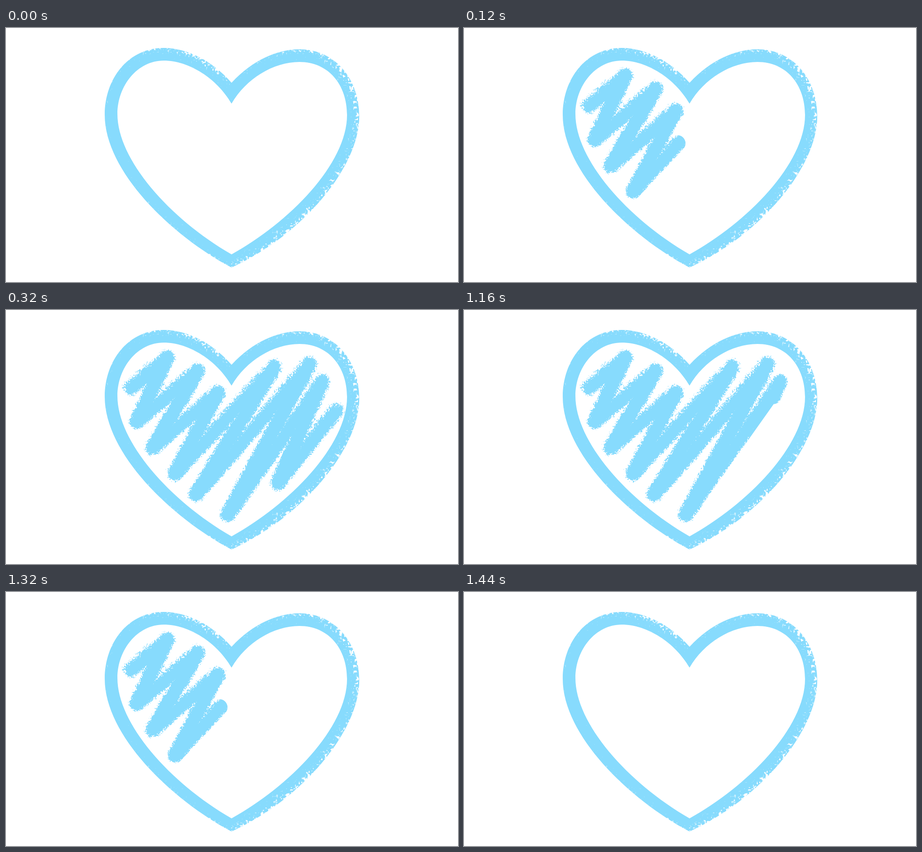
These frames come from a looping animation (998 by 561 pixels, 1960 ms). An HTML page with a canvas:

```html
<!DOCTYPE html>
<html lang="en">
<head>
<meta charset="utf-8">
<title>Scribbled heart</title>
<style>
  html, body { margin: 0; width: 100%; height: 100%; overflow: hidden; background: #fff; }
  canvas { display: block; width: 100%; height: 100%; }
</style>
</head>
<body>
<canvas id="stage" width="998" height="561"></canvas>
<script>
const start = performance.now();
const W = 998, H = 561, BLUE = '#87dbfd';
const LOOP = 1960, STEP = 40, STEPS = 8, ERASE_AT = 1160, LEAD_IN = 80;

const OUTER = 'M498 121C455 72 400 44 348 44C270 44 218 112 218 192C218 316 364 458 498 529' +
  'C650 460 780 310 780 195C780 112 726 47 648 47C600 47 545 70 498 121Z';
const INNER = 'M498 167C466 112 405 72 348 72C290 72 246 128 246 190C246 290 360 420 498 500' +
  'C625 430 753 300 753 192C753 125 712 75 648 75C590 75 530 112 498 167Z';

// Turning points of the crayon scribble
const TURNS = [
  [276, 170], [355, 105], [289, 245], [422, 134], [324, 303], [467, 182], [373, 360],
  [591, 126], [420, 406], [669, 120], [490, 450], [697, 158], [600, 381], [728, 222]
];

const clamp = v => Math.max(0, Math.min(1, v));
const mix = (a, b, t) => a + (b - a) * t;

function makeLayer() {
  const layer = document.createElement('canvas');
  layer.width = W;
  layer.height = H;
  layer.fillStyle = BLUE;
  return layer.getContext('2d', { willReadFrequently: true });
}

function hash(x, y) {
  let h = Math.imul(x, 374761393) + Math.imul(y, 668265263) | 0;
  h = Math.imul(h ^ h >>> 13, 1274126177);
  return ((h ^ h >>> 16) >>> 0) / 4294967296;
}

function grain(x, y, size) {
  x /= size;
  y /= size;
  const i = Math.floor(x), j = Math.floor(y), u = x - i, v = y - j;
  return mix(mix(hash(i, j), hash(i + 1, j), u), mix(hash(i, j + 1), hash(i + 1, j + 1), u), v);
}

// Fills the layer in blue, then scales each pixel's alpha by keep(x, y, index)
function texture(path, keep) {
  const layer = makeLayer();
  layer.fillStyle = BLUE;
  layer.fill(path, 'evenodd');
  const image = layer.getImageData(0, 0, W, H);
  for (let y = 0, k = 3; y < H; y++) {
    for (let x = 0; x < W; x++, k += 4) {
      if (image.data[k]) image.data[k] *= keep(x, y, k);
    }
  }
  layer.putImageData(image, 0, 0);
  return layer.canvas;
}

// A blurred, shifted heart tells how near a pixel is to an edge that faces right
function makeHeart() {
  const soft = makeLayer();
  soft.filter = 'blur(12px)';
  soft.translate(-10, 0);
  soft.fill(new Path2D(OUTER));
  const inside = soft.getImageData(0, 0, W, H).data;
  return texture(new Path2D(OUTER + INNER), (x, y, k) => {
    const slope = mix(.5, 1, clamp(Math.abs(y - 265) / 130));
    const wear = .75 * slope * (1 - inside[k] / 255) - .05;
    const n = grain(x, y, 2.8);
    const bare = clamp((wear - n) * 9);
    const pale = .3 * clamp((wear + .12 - n) * 9);
    return 1 - Math.max(bare, pale);
  });
}

const segments = TURNS.slice(1).map(([bx, by], i) => {
  const [ax, ay] = TURNS[i], dx = bx - ax, dy = by - ay;
  return { ax, ay, dx, dy, length: Math.hypot(dx, dy) };
});

// Crayon cover: solid near the line, looser grain above the rising strokes
function cover(x, y) {
  let most = 0;
  for (const { ax, ay, dx, dy, length } of segments) {
    const px = x - ax, py = y - ay;
    const t = clamp((px * dx + py * dy) / (length * length));
    const d = Math.hypot(px - t * dx, py - t * dy);
    const loose = dy < 0 && dx * py - dy * px < 0;
    most = Math.max(most, .5 + (loose ? (16 - d) / 14 : (17 - d) / 9));
  }
  return most;
}

function makeScribble() {
  const area = new Path2D();
  area.rect(255, 80, 497, 400);
  return texture(area, (x, y) => {
    const n = (grain(x, y, 1.6) - .5) * 1.3 + .5;
    const c = cover(x, y);
    return c <= 0 ? 0 : clamp((c - n) * 4 + .5 * c);
  });
}

const route = new Path2D();
TURNS.forEach(([x, y]) => route.lineTo(x, y));

let total = 0;
const turnLengths = segments.map(s => total += s.length);

const heart = makeHeart();
const scribble = makeScribble();
const reveal = makeLayer();
const stage = document.getElementById('stage').getContext('2d');

function strokeRoute(width, length) {
  reveal.lineWidth = width;
  reveal.setLineDash([length, 2 * total]);
  reveal.stroke(route);
}

// Older strokes show their loose grain; the newest ones have a clean edge
function drawReveal(step) {
  reveal.globalCompositeOperation = 'source-over';
  reveal.clearRect(0, 0, W, H);
  const reach = step / STEPS * (total + LEAD_IN) - LEAD_IN;
  reveal.lineCap = reveal.lineJoin = 'round';
  const settled = turnLengths.filter(length => length <= reach).at(-2);
  if (settled) strokeRoute(46, settled);
  strokeRoute(36, reach);
  reveal.globalCompositeOperation = 'source-in';
  reveal.drawImage(scribble, 0, 0);
}

function stepAt(time) {
  if (time < ERASE_AT) return Math.min(STEPS, Math.floor(time / STEP));
  return Math.max(0, STEPS - 1 - Math.floor((time - ERASE_AT) / STEP));
}

let shown = -1;
function render() {
  const step = stepAt((performance.now() - start) % LOOP);
  if (step !== shown) {
    shown = step;
    stage.fillStyle = '#fff';
    stage.fillRect(0, 0, W, H);
    stage.drawImage(heart, 0, 0);
    if (step === STEPS) {
      stage.drawImage(scribble, 0, 0);
    } else if (step > 0) {
      drawReveal(step);
      stage.drawImage(reveal.canvas, 0, 0);
    }
  }
  requestAnimationFrame(render);
}
render();
</script>
</body>
</html>
```
